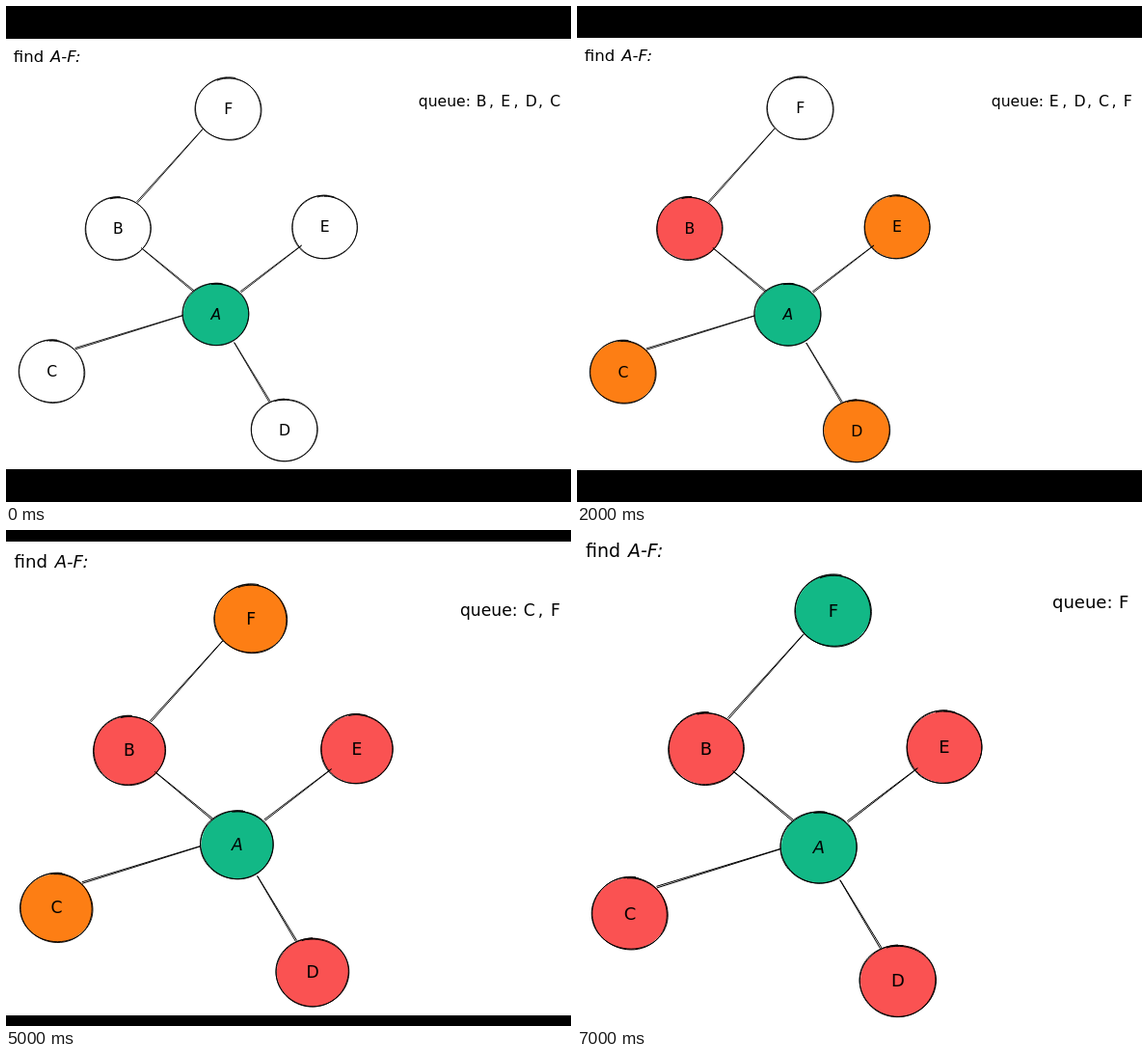
An HTML page with a canvas for the animation above (8000 ms loop, 586 px wide and 514 px high).

```html
<!DOCTYPE html>
<html lang="en">
<head>
<meta charset="utf-8">
<title>Breadth-first search</title>
<style>
  html, body { margin: 0; width: 100%; height: 100%; overflow: hidden; background: #000; }
  canvas { display: block; }
</style>
</head>
<body>
<canvas id="stage" width="586" height="514"></canvas>
<script>
const W = 586, H = 514, STEP = 1000;
const ctx = document.getElementById('stage').getContext('2d');

const FILL = { w: '#ffffff', g: '#12b886', o: '#fd7e14', r: '#fa5252' };
const INK = '#000000';

const nodes = [
  { name: 'A', x: 251, y: 329 },
  { name: 'B', x: 134, y: 226.7 },
  { name: 'C', x: 55, y: 397.5 },
  { name: 'D', x: 333, y: 467.3 },
  { name: 'E', x: 381, y: 225 },
  { name: 'F', x: 266, y: 83.8 }
];

// Each edge starts at the end where its two strokes drift apart.
const edges = [
  [157, 195, 235, 108],
  [224, 301, 162, 250],
  [281, 302, 353, 247],
  [83, 370, 211, 330.5],
  [315, 433, 273, 363]
];

// Colours run from A to F; height is that of the white page.
const steps = [
  { fills: 'gwwwww', queue: 'BEDC', height: 446 },
  { fills: 'goooow', queue: 'BEDC', height: 446 },
  { fills: 'grooow', queue: 'EDCF', height: 448 },
  { fills: 'groooo', queue: 'EDCF', height: 448 },
  { fills: 'grooro', queue: 'DCF', height: 467 },
  { fills: 'grorro', queue: 'CF', height: 491 },
  { fills: 'grrrro', queue: 'F', height: 514 },
  { fills: 'grrrrg', queue: 'F', height: 514 }
];

function write(text, x, y, size = 18, align = 'left') {
  const slant = text[0] === 'A' ? 'italic ' : '';
  ctx.font = `${slant}${size}px "DejaVu Sans", sans-serif`;
  ctx.textAlign = align;
  ctx.fillStyle = INK;
  ctx.fillText(text, x, y);
}

function drawEdge([x1, y1, x2, y2]) {
  const len = Math.hypot(x2 - x1, y2 - y1);
  const nx = (y2 - y1) / len, ny = (x1 - x2) / len;
  for (const gap of [-0.8, 0.8]) {
    ctx.beginPath();
    ctx.moveTo(x1 + nx * gap, y1 + ny * gap);
    ctx.lineTo(x2 + nx * gap * 0.2, y2 + ny * gap * 0.2);
    ctx.stroke();
  }
}

// An open loop, slightly uneven, whose ends overlap near the top.
function sketchLoop(x, y, seed) {
  const start = -1.75 + 0.25 * Math.sin(seed * 3);
  const turn = Math.PI * 2 + 0.3;
  ctx.beginPath();
  for (let i = 0; i <= 64; i++) {
    const k = i / 64, a = start + turn * k;
    const r = 1 + 0.013 * Math.sin(2 * a + seed * 2.3)
      + 0.008 * Math.sin(3 * a + seed * 4.1) + 0.025 * (k - 0.5);
    ctx.lineTo(x + 39.2 * r * Math.cos(a), y + 37.2 * r * Math.sin(a));
  }
  ctx.stroke();
}

function drawNode({ name, x, y }, fill, i) {
  ctx.fillStyle = fill;
  ctx.beginPath();
  ctx.ellipse(x, y, 39.2, 37.2, 0, 0, Math.PI * 2);
  ctx.fill();
  sketchLoop(x, y, i + 1);
  sketchLoop(x, y, i + 8.5);
  write(name, x, y + 6, 18, 'center');
}

function drawQueue(names) {
  write('queue:', 493, 81);
  [...names].forEach((name, i) => {
    const x = 562 + 29.4 * i;
    write(name, x, 81);
    if (i < names.length - 1) write(',', x + 15.5, 81);
  });
}

function draw({ fills, queue, height }) {
  const top = Math.ceil((H - height) / 2), scale = height / H;
  ctx.setTransform(1, 0, 0, 1, 0, 0);
  ctx.fillStyle = '#000';
  ctx.fillRect(0, 0, W, H);
  ctx.fillStyle = '#fff';
  ctx.fillRect(0, top, W, height);

  ctx.setTransform(scale, 0, 0, scale, 0, top);
  ctx.strokeStyle = INK;
  ctx.lineWidth = 1;
  ctx.lineCap = ctx.lineJoin = 'round';
  nodes.forEach((node, i) => drawNode(node, FILL[fills[i]], i));
  edges.forEach(drawEdge);
  write('find', 9, 28, 19);
  write('A-F:', 53, 28, 19);
  drawQueue(queue);
}

const origin = performance.now();
function tick(now) {
  const t = Math.max(0, now - origin);
  draw(steps[Math.floor(t / STEP) % steps.length]);
  requestAnimationFrame(tick);
}
tick(origin);
</script>
</body>
</html>
```
